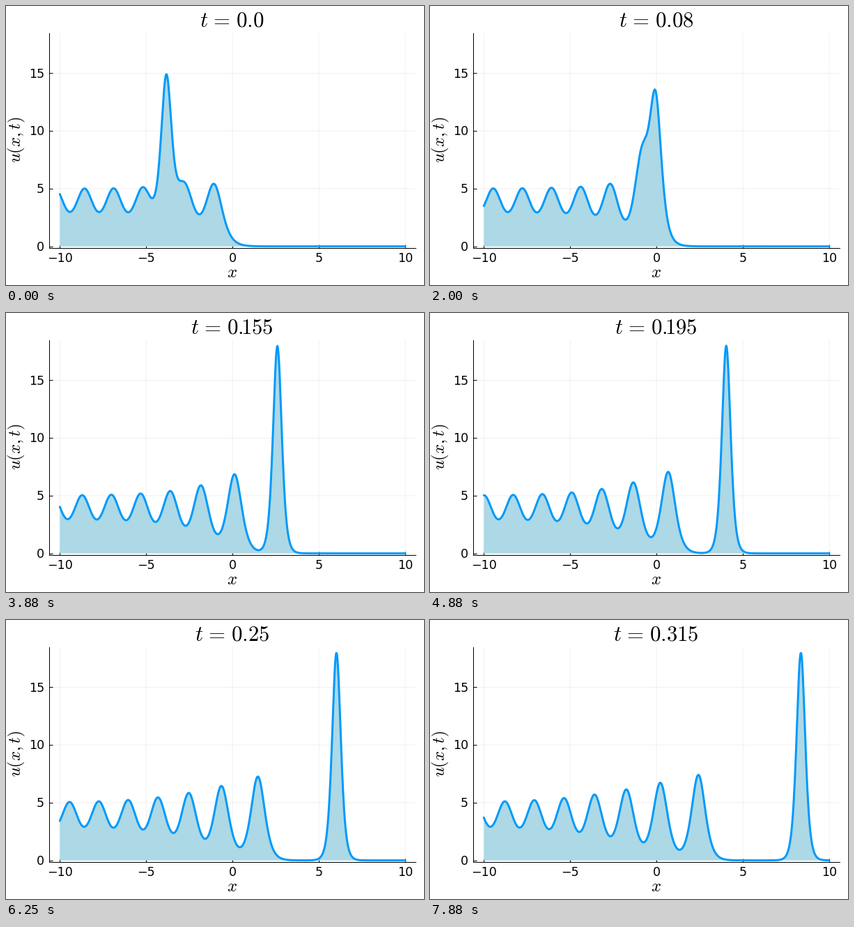
A matplotlib script that plays this animation: 600 by 400 pixels, repeating every 8 s.

```python
import numpy as np
import matplotlib.pyplot as plt
from matplotlib.animation import FuncAnimation
from matplotlib.transforms import ScaledTranslation

# KdV soliton gas (spectrum k in [1, 2]) overtaken by one k = 3 soliton
FRAMES, STEP, INTERVAL = 64, 0.005, 125
W, H, DPI = 600, 400, 100
NODES = 32


def pt(px):
    return px * 72 / DPI


def spectrum(n):
    """Wave numbers and norming constants; density sqrt((k-1)(2-k))/pi."""
    phi = np.arange(1, n + 1) * np.pi / (n + 1)
    k = np.append(3.0, 1.5 + 0.5 * np.cos(phi))
    c = np.append(1e-7, 0.25 * np.sin(phi) ** 2 / (n + 1))
    return k, c


def cauchy_factor(k):
    """Pivoted triangular L with L @ L.T = 1 / (k_i + k_j), and the pivot order."""
    g = np.ones_like(k)
    cols, order = [], []
    for _ in k:
        p = int(np.argmax(np.abs(g) / np.sqrt(2 * k)))
        order.append(p)
        cols.append(np.sqrt(2 * k[p]) / (k + k[p]) * g)
        g = g * (k - k[p]) / (k + k[p])
    return np.array(cols).T[order], order


k, c = spectrum(NODES)
L, order = cauchy_factor(k)
k, c = k[order], c[order]


def wave(x, t):
    """u = 2 (log det(I + A))_xx, by QR so that large exponents stay harmless."""
    n = len(k)
    log_v = 0.5 * np.log(c) - np.outer(x, k) + 4 * k**3 * t
    a = np.empty((len(x), 2 * n, n))
    a[:, :n] = L.T
    a[:, n:] = np.exp(-log_v)[:, :, None] * np.eye(n)
    r = np.linalg.qr(a, mode="r")
    rhs = np.stack([np.ones(n), k], axis=1)
    z = np.zeros((len(x), n, 2))
    for j in range(n):
        done = np.einsum("pm,pmc->pc", r[:, :j, j], z[:, :j])
        z[:, j] = (rhs[j] - done) / r[:, j, j, None]
    s = (z[..., 0] ** 2).sum(axis=1)
    return 4 * (z[..., 0] * z[..., 1]).sum(axis=1) - 2 * s**2


x = np.linspace(-10, 10, 601)
waves = [wave(x, i * STEP) for i in range(FRAMES)]

plt.rcParams.update({"font.family": "DejaVu Sans", "mathtext.fontset": "cm"})
fig = plt.figure(figsize=(W / DPI, H / DPI), dpi=DPI, facecolor="white")
ax = fig.add_axes([62.4 / W, 53.4 / H, 525.6 / W, 308 / H])
ax.set(xlim=(-10.6, 10.6), ylim=(-0.12, 18.5),
       xticks=range(-10, 11, 5), yticks=range(0, 16, 5))
ax.set_axisbelow(True)
ax.grid(color="black", alpha=0.06, linewidth=pt(1))
for grid_line in ax.get_xgridlines() + ax.get_ygridlines():
    grid_line.set_snap(False)
ax.tick_params(direction="in", length=pt(5), width=pt(1), labelsize=12.6)
ax.tick_params(axis="x", pad=pt(6.4))
ax.tick_params(axis="y", pad=pt(7.3))
lift = ScaledTranslation(0, 0.8 / DPI, fig.dpi_scale_trans)
for tick_label in ax.get_yticklabels():
    tick_label.set_transform(tick_label.get_transform() + lift)
for side, spine in ax.spines.items():
    spine.set_visible(side in ("left", "bottom"))
    spine.set_linewidth(pt(1))
    spine.set_zorder(0.6)


def label(px, py, text, size, **kw):
    return fig.text(px / W, 1 - py / H, text, fontsize=size, ha="center",
                    va="baseline", **kw)


title = label(324.5, 30, "", 22.2)
label(324.5, 389.4, "$x$", 17.8)
label(21, 191.5, "$u(x,t)$", 17.6, rotation=90, rotation_mode="anchor")

area, = ax.fill([0, 0, 0], [0, 0, 0], color="lightblue", linewidth=0, zorder=1.5)
line, = ax.plot([], [], color="#009afa", linewidth=pt(3),
                solid_joinstyle="round", solid_capstyle="round", zorder=2)


def draw(i):
    u = waves[i]
    area.set_xy(np.column_stack([np.r_[x[0], x, x[-1]], np.r_[0, u, 0]]))
    line.set_data(x, u)
    # a 1 sits closer to the decimal point
    num = str(round(i * STEP, 3)).replace("0.1", r"0.\hspace{-0.35}1")
    title.set_text(r"$t\hspace{0.117}=\hspace{0.117}" + num + "$")
    return area, line, title


anim = FuncAnimation(fig, draw, frames=FRAMES, interval=INTERVAL,
                     repeat=True, repeat_delay=0, blit=False)
plt.show()
```
